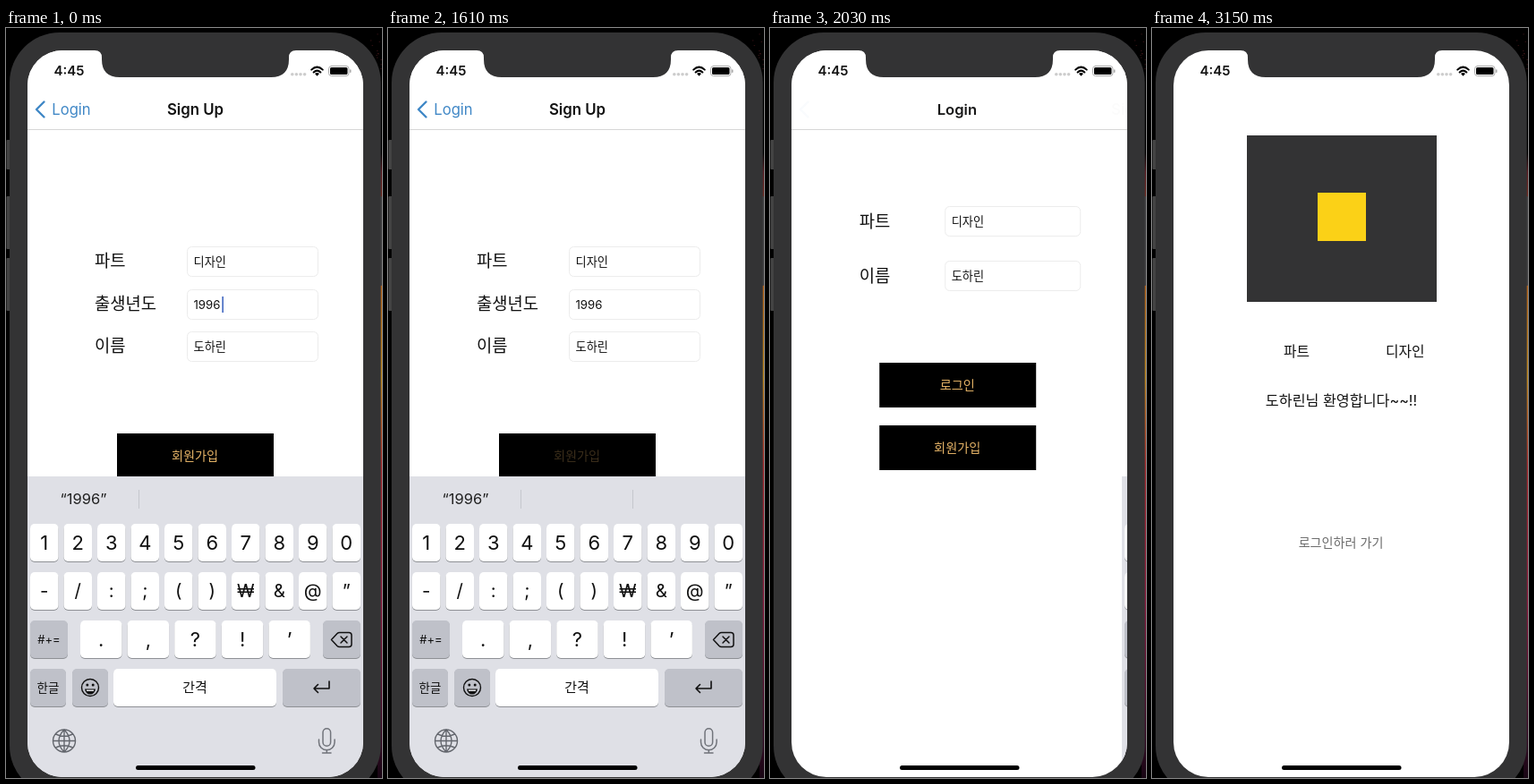
Animation, 420 px wide and 838 px high, one loop 3.22 s. Source, as an HTML page with a canvas:

```html
<!DOCTYPE html>
<html lang="ko">
<head>
<meta charset="utf-8">
<title>Sign Up</title>
<style>
  html, body { margin: 0; width: 100%; height: 100%; overflow: hidden; background: #000; }
  canvas { display: block; width: 420px; height: 838px; }
</style>
</head>
<body>
<canvas id="stage" width="420" height="838"></canvas>
<script>
const ctx = document.getElementById('stage').getContext('2d');
const LOOP = 3220, STEP = 70;
const SCREEN = { x: 24, y: 25, w: 375, h: 812 };
const FONT = 'Inter, "Noto Sans CJK KR", "Noto Sans CJK", sans-serif';
const GOLD = '#e6b467', BODY = '#333334', BLUE = '#3f87c6';
const USER = '도하린';

// Critically damped spring from 0 to 1
function spring(t, start) {
  const x = Math.max(0, t - start) * 0.0185;
  return 1 - (1 + x) * Math.exp(-x);
}

// Runs a drawing with its own transform and opacity
function layer(dx, dy, alpha, draw) {
  ctx.save();
  ctx.translate(dx, dy);
  ctx.globalAlpha *= alpha;
  draw();
  ctx.restore();
}

function text(str, x, midY, size, { color = '#111', weight = 400, align = 'left' } = {}) {
  ctx.font = `${weight} ${size}px ${FONT}`;
  ctx.textAlign = align;
  ctx.fillStyle = color;
  ctx.fillText(str, x, midY + size * 0.36);
}

const centered = (str, x, y, size, opts) => text(str, x, y, size, { ...opts, align: 'center' });

function rect(x, y, w, h, color) {
  ctx.fillStyle = color;
  ctx.fillRect(x, y, w, h);
}

function round(x, y, w, h, r, color) {
  ctx.beginPath();
  ctx.roundRect(x, y, w, h, r);
  ctx.fillStyle = color;
  ctx.fill();
}

function stroke(path, color, width) {
  ctx.strokeStyle = color;
  ctx.lineWidth = width;
  ctx.lineCap = ctx.lineJoin = 'round';
  ctx.stroke(new Path2D(path));
}

function dot(x, y, r, color) {
  ctx.beginPath();
  ctx.arc(x, y, r, 0, Math.PI * 2);
  ctx.fillStyle = color;
  ctx.fill();
}

function field(x, y, w, value) {
  ctx.beginPath();
  ctx.roundRect(x + 0.5, y + 0.5, w - 1, 33, 5);
  ctx.fillStyle = '#fff';
  ctx.fill();
  ctx.strokeStyle = '#ececec';
  ctx.lineWidth = 1;
  ctx.stroke();
  text(value, x + 7.5, y + 17, 13.2);
}

function button(y, label, alpha = 1) {
  rect(124, y, 175, 50, '#000');
  layer(0, 0, alpha, () => centered(label, 211, y + 25, 14.2, { color: GOLD }));
}

const label = (str, y, x) => text(str, x, y, 18.8, { weight: 350 });

function key(x, y, w, str, size = 22, gray = false) {
  round(x, y + 1, w, 42, 5, '#8e9095');
  round(x, y, w, 42, 5, gray ? '#bfc1c9' : '#fff');
  if (str) centered(str, x + w / 2, y + 21, size);
}

function keyboard(t) {
  rect(24, 501, 375, 337, '#dfe0e6');
  centered('“1996”', 86.5, 526, 16.5, { color: '#222' });
  if (t < 1700) {
    rect(148, 516, 1, 21, '#c5c7cd');
    if (t >= STEP) rect(273, 516, 1, 21, '#c5c7cd');
  }
  [...'1234567890'].forEach((c, i) => key(27 + i * 37.5, 554, 31.5, c));
  [...'-/:;()₩&@”'].forEach((c, i) => key(27 + i * 37.5, 608, 31.5, c, 20.5));
  key(27, 662, 42, '#+=', 13, true);
  [...'.,?!’'].forEach((c, i) => key(83 + i * 52.6, 662, 46.5, c));
  key(354, 662, 42, '', 0, true);
  key(27, 716, 40, '한글', 13.5, true);
  key(74, 716, 40, '', 0, true);
  key(120, 716, 182, '간격', 15);
  key(309, 716, 87, '', 0, true);

  // Delete, smiley and return
  stroke('M363.5 683.5 L370 676.5 Q371 675.5 372.5 675.5 H383 Q386 675.5 386 678.5 V688.5 Q386 691.5 383 691.5 H372.5 Q371 691.5 370 690.5 Z M374 680 l7 7 m0 -7 l-7 7', '#111', 1.5);
  stroke('M84.5 737 a9.5 9.5 0 1 0 19 0 a9.5 9.5 0 1 0 -19 0', '#111', 1.4);
  dot(90.8, 734, 1.5, '#111');
  dot(97.2, 734, 1.5, '#111');
  ctx.fill(new Path2D('M88 738.5 H100 Q99 744.5 94 744.5 Q89 744.5 88 738.5 Z'));
  rect(90, 739.5, 8, 1.5, '#e7e8eb');
  stroke('M361 730 V738 H344 m4.5 -4.5 l-4.5 4.5 l4.5 4.5', '#111', 1.6);

  // Globe and microphone
  stroke('M52.5 796.5 a12.5 12.5 0 1 0 25 0 a12.5 12.5 0 1 0 -25 0 M65 784 V809 M52.5 796.5 H77.5 M65 784 q-12 12.5 0 25 q12 -12.5 0 -25 M55.5 789 q9.5 4.5 19 0 M55.5 804 q9.5 -4.5 19 0', '#63666d', 1.4);
  stroke('M354 787 a4.3 4.3 0 0 1 8.6 0 V798 a4.3 4.3 0 0 1 -8.6 0 Z M349.5 795 V798 a8.8 8.8 0 0 0 17.6 0 V795 M358.3 807 V810 M353.5 810 H363', '#70737a', 1.5);
}

function signUp(t) {
  rect(24, 25, 375, 813, '#fff');
  label('파트', 260.5, 99);
  label('출생년도', 308.5, 99);
  label('이름', 355.5, 99);
  field(202, 244, 147, '디자인');
  field(202, 292, 147, '1996');
  field(202, 339, 147, USER);
  const blinkOff = t >= 1330 || (t >= 350 && t < 770);
  if (!blinkOff) rect(241.3, 300, 1.7, 18, '#4b6fc4');
  const pressed = t >= 1540 ? Math.min(1, 0.25 + Math.max(0, t - 1660) / 600) : 1;
  button(453, '회원가입', pressed);
  keyboard(t);
}

function login() {
  rect(24, 25, 375, 813, '#fff');
  label('파트', 216, 101.5);
  label('이름', 277, 101.5);
  field(197, 199, 152, '디자인');
  field(197, 260, 152, USER);
  button(374, '로그인');
  button(444, '회원가입');
}

function welcome() {
  rect(24, 25, 375, 813, '#fff');
  rect(106, 120, 212, 186, BODY);
  rect(185, 184, 54, 54, '#fbd117');
  text('파트', 147, 361, 15.8);
  text('디자인', 261, 361, 15.8);
  centered(USER + '님 환영합니다~~!!', 211.5, 416, 16.2);
  centered('로그인하러 가기', 211, 575, 14.1, { color: '#6b6b6b' });
}

function navBar(p) {
  rect(24, 25, 375, 88, '#fff');
  rect(24, 113, 375, 1, '#d6d6d6');
  const slide = Math.pow(p, 1.2);
  const title = { weight: 600, color: '#111' };
  layer(0, 0, 1 - p * p, () => stroke('M42.5 82.5 L34 91 L42.5 99.5', BLUE, 2.4));
  layer(138.5 * slide, 0, 1 - p, () => centered('Login', 73, 91, 16.6, { color: BLUE }));
  layer(138.5 * (slide - 1), 0, p * p, () => centered('Login', 211.5, 91, 16.6, title));
  layer(205 * slide, 0, 1 - p, () => centered('Sign Up', 211.5, 91, 16.8, title));
}

function statusBar() {
  centered('4:45', 70.5, 48, 15, { weight: 600 });
  for (let i = 0; i < 4; i++) dot(319.8 + i * 4.6, 51.7, 1.8, '#cdcdcd');
  stroke('M341.2 46.6 Q347.5 40.6 353.8 46.6 M343.6 49.5 Q347.5 45.8 351.4 49.5', '#000', 2);
  ctx.fillStyle = '#000';
  ctx.fill(new Path2D('M345 51 Q347.5 49 350 51 L347.5 53.8 Z'));
  stroke('M363.5 42.5 H380 Q383 42.5 383 45.5 V50.5 Q383 53.5 380 53.5 H363.5 Q360.5 53.5 360.5 50.5 V45.5 Q360.5 42.5 363.5 42.5 Z', '#aaa', 1);
  round(362, 44, 19.5, 8, 1.6, '#000');
  round(384, 46.3, 1.5, 3.8, 1, '#aaa');
}

function backdrop() {
  rect(0, 0, 420, 838, '#000');
  const glow = ctx.createLinearGradient(0, 140, 0, 838);
  [[0, '#000'], [0.03, '#5a1c22'], [0.21, '#b5651c'], [0.36, '#c08a20'], [0.5, '#a82c30'], [0.72, '#8a1c40'], [0.92, '#3c0c28'], [1, '#180614']]
    .forEach(([at, color]) => glow.addColorStop(at, color));
  rect(415, 140, 5, 698, glow);
  let seed = 7;
  const random = () => (seed = seed * 16807 % 2147483647) / 2147483647;
  for (let i = 0; i < 16; i++) rect(402 + random() * 18, 4 + random() * 45, 1, 1, '#47191c');
  [[125, 33], [188, 59], [257, 59]].forEach(([y, h]) => round(0.5, y, 6, h, 1, '#444'));
  round(414, 188, 6, 100, 1, '#454547');
  round(4, 5, 414.7, 853, 56, BODY);
}

function draw(t) {
  backdrop();
  ctx.save();
  ctx.beginPath();
  ctx.roundRect(SCREEN.x, SCREEN.y, SCREEN.w, SCREEN.h, 39);
  ctx.clip();

  const pop = spring(t, 1700);
  const drop = spring(t, 2209);
  if (drop > 0) welcome();
  if (t < 2660) {
    layer(0, drop * SCREEN.h, 1, () => {
      if (pop > 0) {
        layer(-0.3 * SCREEN.w * (1 - pop), 0, 1, login);
        rect(24, 25, 375, 813, `rgba(0,0,0,${0.08 * (1 - pop)})`);
      }
      if (t < 2200) layer(SCREEN.w * pop, 0, 1, () => signUp(t));
      navBar(t < 2200 ? pop : 1);
    });
  }
  statusBar();
  round(145, 824, 133.5, 5, 2.5, '#000');
  ctx.restore();

  // Notch
  ctx.fillStyle = BODY;
  ctx.fill(new Path2D('M99 24 V25 Q107 25 107 33 V35 Q107 55 127 55 H296 Q316 55 316 35 V33 Q316 25 324 25 V24 Z'));
}

function tick() {
  const t = performance.now() % LOOP;
  draw(Math.floor(t / STEP) * STEP);
  requestAnimationFrame(tick);
}
tick();
</script>
</body>
</html>
```
